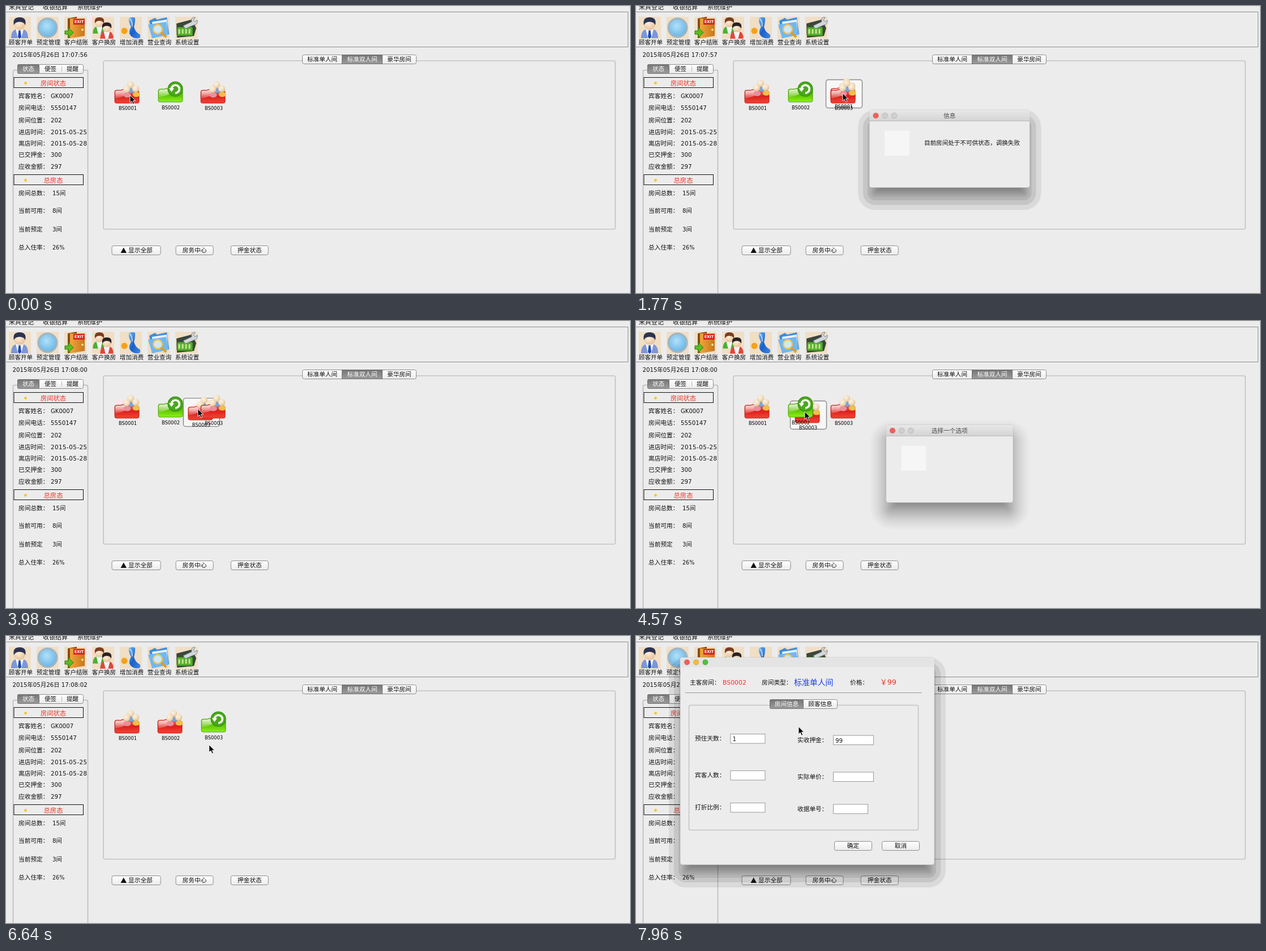
Write an HTML page that moves like this. It is 1102 px wide and 508 px high and loops after 8 s.

```html
<!DOCTYPE html>
<html lang="zh-CN">
<head>
<meta charset="utf-8">
<title>客房管理</title>
<style>
html, body { margin: 0; width: 100%; height: 100%; overflow: hidden; background: #ececec; }
svg { display: block; width: 1102px; height: 508px; }
text { font-family: "DejaVu Sans", "Noto Sans CJK SC", "Noto Sans CJK", sans-serif; white-space: pre; }
</style>
</head>
<body>
<svg viewBox="0 0 1102 508" xmlns="http://www.w3.org/2000/svg">
<defs>
  <linearGradient id="btn" x2="0" y2="1"><stop stop-color="#fff"/><stop offset=".5" stop-color="#f5f5f5"/><stop offset="1" stop-color="#ececec"/></linearGradient>
  <linearGradient id="sel" x2="0" y2="1"><stop stop-color="#767676"/><stop offset="1" stop-color="#9b9b9b"/></linearGradient>
  <linearGradient id="def" x2="0" y2="1"><stop stop-color="#a9d2f7"/><stop offset="1" stop-color="#5aa9ee"/></linearGradient>
  <linearGradient id="bar" x2="0" y2="1"><stop stop-color="#e8e8e8"/><stop offset="1" stop-color="#d4d4d4"/></linearGradient>
  <linearGradient id="red" x2="0" y2="1"><stop stop-color="#f0645a"/><stop offset=".5" stop-color="#dd1f1a"/><stop offset="1" stop-color="#f04a3c"/></linearGradient>
  <linearGradient id="green" x2="0" y2="1"><stop stop-color="#7ccc2c"/><stop offset=".5" stop-color="#5fc400"/><stop offset="1" stop-color="#8cf01c"/></linearGradient>
  <linearGradient id="shine" x2="0" y2="1"><stop stop-color="#fff" stop-opacity=".8"/><stop offset="1" stop-color="#fff" stop-opacity=".2"/></linearGradient>
  <linearGradient id="blue" x2="1" y2="1"><stop stop-color="#6fbdf5"/><stop offset=".5" stop-color="#1a5fc9"/><stop offset="1" stop-color="#3f8be6"/></linearGradient>
  <linearGradient id="wood" x2="1" y2="0"><stop stop-color="#f0a53c"/><stop offset="1" stop-color="#c8761c"/></linearGradient>
  <radialGradient id="skin" cx=".4" cy=".35" r=".7"><stop stop-color="#fff0dc"/><stop offset="1" stop-color="#e6bd92"/></radialGradient>
  <radialGradient id="pale" cx=".4" cy=".35" r=".75"><stop stop-color="#fdf3e2"/><stop offset=".6" stop-color="#f0d9b8"/><stop offset="1" stop-color="#cfa878"/></radialGradient>
  <radialGradient id="disc" cx=".45" cy=".4" r=".65"><stop stop-color="#b4e0fa"/><stop offset="1" stop-color="#62b2e2"/></radialGradient>
</defs>
<g id="base"></g>
<g id="live"></g>
</svg>
<script>
const STEP = 147.4, LOOP = 8000;
const el = id => document.getElementById(id);

const text = (x, mid, s, size = 10.7, fill = '#111', anchor = 'start', extra = '') =>
  `<text x="${x}" y="${mid + size * .37}" font-size="${size}" fill="${fill}" text-anchor="${anchor}" ${extra}>${s}</text>`;
const rect = (x, y, w, h, fill = 'none', stroke = 'none', r = 0, extra = '') =>
  `<rect x="${x}" y="${y}" width="${w}" height="${h}" rx="${r}" fill="${fill}" stroke="${stroke}" ${extra}/>`;
const path = (d, fill = 'none', stroke = 'none', w = 1) =>
  `<path d="${d}" fill="${fill}" stroke="${stroke}" stroke-width="${w}"/>`;
const circle = (x, y, r, fill, stroke = 'none', w = 1) =>
  `<circle cx="${x}" cy="${y}" r="${r}" fill="${fill}" stroke="${stroke}" stroke-width="${w}"/>`;
const at = (x, y, body) => `<g transform="translate(${x} ${y})">${body}</g>`;

const button = (x, y, w, label, fill = 'url(#btn)') =>
  rect(x + .5, y + .5, w, 16, fill, '#8c8c8c', 3) + text(x + w / 2 + .5, y + 8, label, 10.7, '#111', 'middle');

// edges: x positions of the segment borders
function tabs(edges, y, labels, active) {
  const n = labels.length, x0 = edges[0];
  let s = rect(x0 + .5, y + .5, edges[n] - x0, 16, 'url(#btn)', '#8c8c8c', 3);
  labels.forEach((label, i) => {
    const a = edges[i], w = edges[i + 1] - a;
    if (i === active) s += rect(a + .5, y + .5, w, 16, 'url(#sel)', '#707070', i ? 0 : 2);
    else if (i > active + 1) s += path(`M${a + .5} ${y + 4}v9`, 'none', '#b5b5b5');
    s += text(a + w / 2 + .5, y + 8, label, 10.6, i === active ? '#fff' : '#111', 'middle');
  });
  return s;
}

// toolbar pictures, 39 by 39
const bust = (x, y, k, coat, hair) => at(x, y, `<g transform="scale(${k})">` +
  path('M-15 19Q-15 5 -6 3H6Q15 5 15 19Z', coat) + path('M-7 3L-3 19H3L7 3Z', '#f2f5fb') +
  circle(0, -5, 9.5, 'url(#skin)') + path('M-10 -4Q-13 -18 0 -18Q13 -18 10 -4Q8 -10 0 -10Q-8 -10 -10 -4Z', hair) + '</g>');
const icons = [
  bust(19, 19, 1, '#7d97d6', '#2b3350') + path('M17.5 24H20.5L22 36L19 39L16 36Z', '#1f49ab'),
  circle(19.5, 19.5, 16.5, 'url(#disc)', '#a3b4bf', 3),
  path('M6 3L22 0V36L6 38Z', '#8a4a12') + path('M10 3H36V34L10 38Z', 'url(#wood)') +
    rect(16, 4, 20, 10, '#d8261c') + text(26, 9, 'EXIT', 6.6, '#fff', 'middle', 'font-weight="bold"') +
    circle(32, 23, 2, '#f9dc83') + path('M1 25H7V19L16 28L7 37V31H1Z', '#5dbb20', '#2e7c0c'),
  bust(13, 15, .78, '#4bb030', '#7a3d20') + bust(26, 24, .78, '#e0473a', '#2a2022'),
  path('M16 3Q21 -1 27 2Q27 12 25 18Q27 27 35 31Q38 35 34 38Q22 40 17 30Q16 24 20 18Q15 10 16 3Z', 'url(#blue)') +
    path('M17 4Q22 6 22 17', 'none', 'rgba(255,255,255,.6)', 2) + circle(8, 25, 5.5, '#f5a11c'),
  path('M3 7L13 2L17 5L34 1L38 31L8 38Z', '#3e8ddd') + path('M8 9L34 5L36 28L10 33Z', '#e9f3fd') +
    path('M1 14L33 9L37 32L8 38Z', '#6fb8f3') + circle(18, 22, 8, '#cfe8fb', '#f1c24a', 2.4) + path('M24 28L33 36', 'none', '#e09c20', 4),
  path('M2 12L29 5L37 20L33 34L3 37Z', '#3a463d') + rect(3, 18, 28, 16, '#57ad30', '#23561a', 2) +
    path('M7 22V30M13 22V30M19 22V30M25 22V30', 'none', '#c0e890', 3) +
    path('M14 16L29 9Q27 0 35 1L32 6L35 9L39 6Q40 14 32 15L18 21Z', '#d3d8db', '#7d858b')
];
const iconNames = ['顾客开单', '预定管理', '客户结账', '客户换房', '增加消费', '营业查询', '系统设置'];

const header = (y, label) => rect(14, y + .5, 122.5, 18, 'none', '#111') +
  circle(34.5, y + 10.5, 2.4, '#f6c430') + text(83.5, y + 10.5, label, 11.3, '#ee3124', 'middle');

function base() {
  let s = rect(0, 0, 1102, 508, '#ececec');
  ['来宾登记', '收银结算', '系统维护'].forEach((m, i) => s += text([5, 65, 126][i], 2, m, 11));
  s += path('M0 10.5H1098.5V72.5H0', 'none', '#8e8e8e');
  iconNames.forEach((name, i) => {
    const x = 5 + i * 49;
    s += at(x, 19, rect(0, 0, 39, 39, '#f0dec5') + icons[i]) + text(x + 21, 64, name, 10.6, '#111', 'middle');
  });
  s += path('M12.5 508V116Q12.5 113.5 15 113.5H142Q144.5 113.5 144.5 116V508', 'none', '#bcbcbc', 1.6);
  s += tabs([20, 58, 98, 136], 103, ['状态', '便签', '提醒'], 0);
  s += header(126, '房间状态') + header(298, '总房态');
  const rows = [['宾客姓名：', 159], ['房间电话：', 180], ['房间位置：', 202], ['进店时间：', 223], ['离店时间：', 243],
    ['已交押金：', 263.5], ['应收金额：', 284], ['房间总数：', 331], ['当前可用：', 362.5], ['当前预定', 395.5], ['总入住率：', 427]];
  rows.forEach(([label, y]) => s += text(22, y, label));
  const wide = 'letter-spacing=".48"';
  s += text(79, 159, 'GK0007', 10.1) + text(79, 180, '5550147', 10.3) + text(79, 202, '202', 10.3);
  s += text(79, 223, '2015-05-25', 10.3, '#111', 'start', wide) + text(79, 243, '2015-05-28', 10.3, '#111', 'start', wide);
  s += text(82, 331, '15间', 10.3) + text(82, 362.5, '8间', 10.3) + text(82, 395.5, '3间', 10.3) + text(82, 427, '26%', 9.6);
  s += rect(172, 97, 904, 298, 'none', '#c3c3c3', 3, 'stroke-width="1.6"');
  s += tabs([523, 593, 664, 724], 86, ['标准单人间', '标准双人间', '豪华房间'], 1);
  s += button(186.5, 424, 86, '') + path('M202.5 437L207.7 427.5L213 437Z', '#111') + text(216, 432, '显示全部');
  return s + button(299.5, 424, 66, '房务中心') + button(396.7, 424, 66, '押金状态');
}

// room pictures, relative to the 64 by 50 tile
const tag = (name, y) => text(32, y, name, 8.3, '#000', 'middle');
const box = (fill, edge) => path('M9 19Q9 16 12 16H20Q24 13 28 17H49Q52 17 52 20V36Q52 39 49 39H12Q9 39 9 36Z', fill, edge, .8);
const gloss = path('M10 20Q10 17 13 17H20Q24 14.5 28 18H34Q30 28 10 30Z', 'url(#shine)');
const guest = (x, y, coat) => `<ellipse cx="${x + 1}" cy="${y + 10}" rx="6.5" ry="4.5" fill="${coat}"/>` + circle(x, y, 6.2, 'url(#pale)');
const taken = (name, up) => box('url(#red)', '#b3160f') + gloss +
  at(0, up ? 0 : 2.5, guest(37, 4, '#7aa3d8') + guest(46, 11, '#efc04a') + guest(30, 12, '#ea8f9c')) +
  path('M10 33Q32 36 51 30V36Q51 38 49 38H12Q10 38 10 36Z', 'rgba(240,56,44,.6)') + tag(name, 48);
const free = name => at(1, -2, box('url(#green)', '#3f9400') + gloss) + circle(40, 14, 13, '#4aa81c', '#2f8a0d', 1.2) +
  path('M33.2 14A7 7 0 1 1 40 21', 'none', '#fff', 3.6) + path('M28.5 12.5H38L33.3 19Z', '#fff') + tag(name, 47);
const plate = rect(.5, .5, 64, 50, '#f7f7f7', '#8a8a8a', 4, 'stroke-width="1.4"');

// bands: [spread, opacity] pairs of stacked layers below the window
const shadow = (x, y, w, h, bands) => bands.map(([d, a]) =>
  rect(x - d, y + 20 - d, w + 2 * d, h + 2 * d, '#000', 'none', Math.max(4, d + 10), `fill-opacity="${a}"`)).join('');
const ramp = (n, d, step, a, grow) => Array.from({ length: n }, (_, i) => [d - i * step, a + i * grow]);
const fine = ramp(13, 28, 4, .015, .0045);
const coarse = [[20, .08], [11, .09], [3, .09], ...ramp(7, -2, 3, .05, .002)];

const lights = (x, y, colors) => colors.map((c, i) => circle(x + i * 16.2, y, 4.8, c, 'rgba(0,0,0,.18)', .8)).join('');

function alert(x, w, title, bands, body) {
  return shadow(x, 184, w, 137, bands) + rect(x, 184, w, 137.5, '#ececec', '#a8a8a8', 4, 'stroke-width=".6"') +
    path(`M${x} 203V188Q${x} 184 ${x + 4} 184H${x + w - 4}Q${x + w} 184 ${x + w} 188V203Z`, 'url(#bar)') +
    path(`M${x} 203.5h${w}`, 'none', '#b8b8b8') + lights(x + 11.5, 194, ['#f75e57', '#d0d0d0', '#d0d0d0']) +
    text(x + w / 2, 194.5, title, 10.7, '#4a4a4a', 'middle') +
    rect(x + 27, 221, 44, 44, '#f6f6f6') + body;
}

function form() {
  const x = 78, w = 449;
  let s = shadow(x, 38, w, 367, coarse) + rect(x, 38, w, 367, '#ececec', '#adadad', 4, 'stroke-width=".6"') +
    path('M78 55V42Q78 38 82 38H523Q527 38 527 42V55Z', '#e4e4e4') + lights(90, 46.5, ['#f75e57', '#fbbc2f', '#4cc436']);
  s += text(95, 82, '主客房间：') + text(153, 82, 'BS0002', 10.9, '#ee3124') + text(222, 82, '房间类型：') +
    text(279, 81.5, '标准单人间', 13.9, '#1d3ff0') + text(378, 82, '价格：') + text(431, 81.5, '￥99', 12.7, '#ee3124');
  s += path('M87 100.5H505', 'none', '#999') + rect(93.5, 122.5, 405, 221, 'none', '#c3c3c3', 3, 'stroke-width="1.5"');
  s += tabs([236, 295, 355], 112, ['房间信息', '顾客信息'], 0);
  const fields = [['预住天数：', 104, 181.5, 61, '1'], ['实收押金：', 285, 184, 71, '99'], ['宾客人数：', 104, 246.5, 61, ''],
    ['实际单价：', 285, 249, 71, ''], ['打折比例：', 104, 303.5, 61, ''], ['收据单号：', 285, 306, 61, '']];
  fields.forEach(([label, lx, y, fw, val]) => {
    const fx = lx < 200 ? 167 : 348.5;
    s += text(lx, y, label) + rect(fx, y - 8, fw, 16.5, '#fff', '#9a9a9a') + text(fx + 3.5, y + .8, val, 10.3);
  });
  return s + button(350, 363, 66, '确定') + button(434, 363, 66, '取消');
}

// pointer stops: step, x, y
const stops = [[0, 219, 158], [1, 218.5, 158], [2, 220, 158], [4, 219, 158], [10, 365, 154.5], [12, 365, 154.5], [17, 636, 290],
  [19, 636, 290], [21, 354, 177.5], [23, 354, 177.5], [25, 361, 153], [30, 298, 160.5], [31, 298, 160.5], [36, 612, 292],
  [40, 612, 292], [47, 296, 168], [50, 287, 160.5], [54, 287, 160.5]];
function pointer(k) {
  const i = Math.max(1, stops.findIndex(p => p[0] >= k));
  const [k0, x0, y0] = stops[i - 1], [k1, x1, y1] = stops[i];
  const u = (k - k0) / (k1 - k0), e = u * u * (3 - 2 * u);
  return [x0 + (x1 - x0) * e, y0 + (y1 - y0) * e];
}
const arrow = path('M0 0V13.2L3.1 10.4L5.4 15.6L7.7 14.6L5.4 9.6H9.6Z', '#000', '#fff', .9);

function live(k) {
  const [px, py] = pointer(k), on = (a, b) => k >= a && k <= b;
  const swapped = k >= 41, shown = k >= 50;
  const up = on(4, 18) || k >= 24;
  const sec = 56 + Math.floor((k * STEP + 60) / 1000);
  const clock = `17:0${7 + Math.floor(sec / 60)}:${String(sec % 60).padStart(2, '0')}`;
  let s = text(11.5, 86, '2015年05月26日 ' + clock, 10.25);
  s += text(79, 263.5, shown ? '99' : '300', 10.3) + text(79, 284, shown ? '149' : '297', 10.3);

  if (on(4, 18)) {
    const [x, y] = pointer(Math.min(k, 12));
    s += at(x - 30, y - 24.5, plate + taken('BS0001', true));
  }
  if (on(25, 40)) {
    const [x, y] = pointer(Math.min(k, 31));
    s += at(x - 26, y - 19.5, plate + taken('BS0003', true));
  }
  s += at(183, 133, taken('BS0001', up));
  if (swapped) {
    const held = k >= 52;
    s += at(259, 133, (held ? plate : '') + `<g ${held ? 'style="filter:brightness(.68)"' : ''}>${taken('BS0002', true)}</g>`);
    s += at(335, 133, free('BS0003'));
  } else {
    s += at(259, 133, free('BS0002')) + at(335, 133, taken('BS0003', up));
  }

  if (on(12, 17)) s += alert(412, 283.5, '信息', coarse,
    text(509, 242, '目前房间处于不可供状态，调换失败', 10.57) + (k > 12 ? button(609, 290, 66, '确定', 'url(#def)') : ''));
  if (on(31, 37)) s += alert(441.5, 224.5, '选择一个选项', fine, k > 31 ?
    button(452, 290, 60, '取消') + button(519, 290, 60, '否') + button(586, 290, 60, '是', 'url(#def)') : '');
  if (k >= 54) s += form();
  return s + at(px, py, arrow);
}

el('base').innerHTML = base();
let last = -1;
function draw() {
  const k = Math.min(54, Math.floor((performance.now() % LOOP + 11) / STEP));
  if (k !== last) el('live').innerHTML = live(last = k);
  requestAnimationFrame(draw);
}
draw();
</script>
</body>
</html>
```
